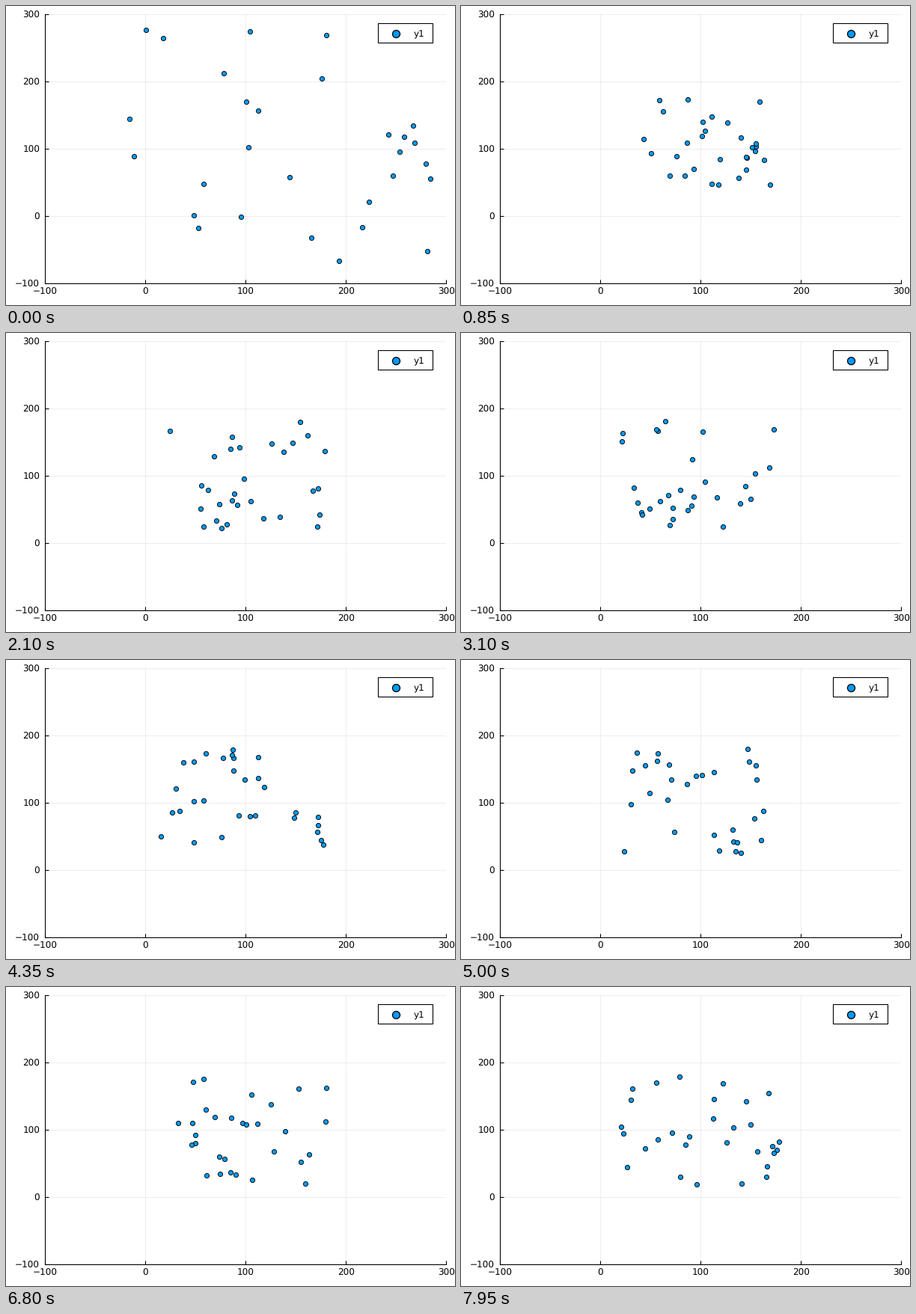
A matplotlib script for the animation above (8 s loop, 600x400 px).

```python
import numpy as np
import matplotlib.pyplot as plt
from matplotlib.animation import FuncAnimation
from matplotlib.patches import Rectangle

W, H, DPI = 600, 400, 100
FRAMES, GATHER, BIRDS = 160, 17, 30
LOW, HIGH = 20, 180
CENTRE = np.array([90, 98])
BLUE = "#009afa"
PT = 72 / DPI  # points per pixel
FONT = 12 * PT


def limit_speed(vel, low=4.5, high=8):
    speed = np.hypot(*vel.T)[:, None] + 1e-9
    return vel / speed * np.clip(speed, low, high)


def step(pos, vel):
    """One flocking step: align, cohere, keep apart, turn at the walls."""
    gap = pos[None] - pos[:, None]
    dist = np.hypot(gap[..., 0], gap[..., 1])
    near = ((dist < 22) & (dist > 0)).astype(float)
    close = ((dist < 12) & (dist > 0)).astype(float)
    count = np.maximum(near.sum(1), 1)[:, None]
    mates = near.sum(1)[:, None] > 0
    align = np.where(mates, near @ vel / count - vel, 0)
    cohere = (near[..., None] * gap).sum(1) / count
    apart = -(close[..., None] * gap).sum(1)
    vel = limit_speed(vel + 0.03 * align + 0.002 * cohere + 0.04 * apart)
    vel = np.where(pos < LOW, np.abs(vel), vel)
    vel = np.where(pos > HIGH, -np.abs(vel), vel)
    return pos + vel, vel


def fly(seed=4):
    """Scatter the birds, draw them together, then let them flock."""
    rng = np.random.default_rng(seed)
    start = rng.uniform(-82, 290, (BIRDS, 2))
    gathered = CENTRE + 0.38 * (start - CENTRE) + rng.normal(0, 8, (BIRDS, 2))
    path = list(np.linspace(start, gathered, GATHER + 1))
    pos, vel = gathered, limit_speed(rng.normal(0, 6, (BIRDS, 2)))
    while len(path) < FRAMES:
        pos, vel = step(pos, vel)
        path.append(pos)
    return path


PATH = fly()

plt.rcParams.update({"font.family": "DejaVu Sans", "text.hinting": "none"})
fig = plt.figure(figsize=(W / DPI, H / DPI), dpi=DPI, facecolor="white")
ax = fig.add_axes([52.2 / W, 1 - 370.8 / H, 536 / W, 360 / H])
ticks = range(-100, 301, 100)
ax.set(xlim=(-100, 300), ylim=(-100, 300), xticks=ticks, yticks=ticks)
ax.grid(color="black", alpha=0.1, linewidth=0.5)
ax.set_axisbelow(True)
ax.spines[["top", "right"]].set_visible(False)
ax.spines[["left", "bottom"]].set_linewidth(1.1 * PT)
ax.tick_params(direction="in", length=5 * PT, width=1.1 * PT, labelsize=FONT)
ax.tick_params(axis="x", pad=6 * PT)
ax.tick_params(axis="y", pad=7 * PT)

dots, = ax.plot([], [], "o", color=BLUE, markeredgecolor="black",
                markersize=6.2 * PT, markeredgewidth=0.9 * PT, clip_on=False)

# Legend, laid out in pixels from the top left.
key = fig.add_axes([0, 0, 1, 1])
key.set(xlim=(0, W), ylim=(H, 0))
key.axis("off")
key.add_patch(Rectangle((497.2, 23.2), 73.2, 26.2, facecolor="white",
                        edgecolor="black", linewidth=1.1 * PT))
key.plot(520.9, 36.5, "o", color=BLUE, markeredgecolor="black",
         markersize=10 * PT, markeredgewidth=1.3 * PT)
key.text(544.7, 41, "y1", fontsize=FONT, va="baseline")


def draw(i):
    dots.set_data(*PATH[i].T)
    return dots,


anim = FuncAnimation(fig, draw, frames=FRAMES, interval=50, repeat=True,
                     repeat_delay=0, blit=False)
plt.show()
```
